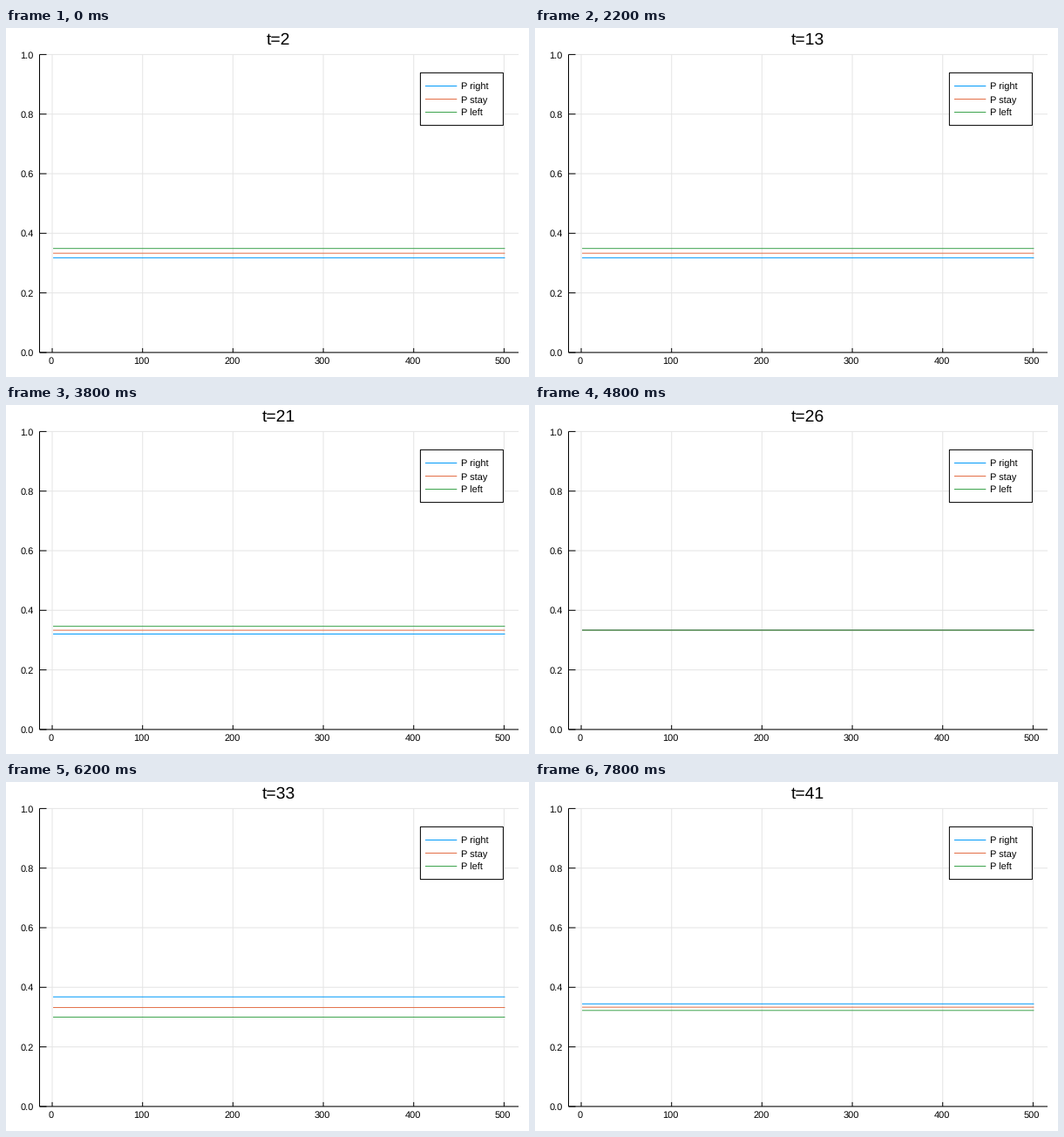
Write a matplotlib script that moves like this. It is 600 px wide and 400 px high and loops after 8 s.

```python
import numpy as np
import matplotlib.pyplot as plt
from matplotlib.animation import FuncAnimation
from matplotlib.patches import Rectangle

W, H, DPI = 600, 400, 100
PX = 72 / DPI
LEFT, RIGHT, TOP, BOTTOM = 38.5, 588, 30.4, 371.9
COLORS = ["#009afa", "#e36f47", "#3ea44e"]
NAMES = ["P right", "P stay", "P left"]

# Drift bias per time step, in hundredths, from t=2 on
BIAS = np.array([
    -4.7, -2, -5.3, -3.5, -1, -3, -2.1, -4, -7, -3,
    -5, -4.7, -2.5, -4.5, -6.1, -3, -1.5, -4, -2.8, -3.9,
    -1.5, -3, -0.8, -2, 0, 1.5, -0.5, 2, 3.4, 1,
    2.5, 10.2, 6, 7.5, 4, 5, 3, 1.5, 2.8, 3.3,
]) / 100

# Snapping would push thin lines half a pixel right and down
plt.rcParams.update({
    "font.family": "Liberation Sans",
    "path.snap": False,
    "text.hinting": "none",
})
fig = plt.figure(figsize=(W / DPI, H / DPI), dpi=DPI, facecolor="white")
ax = fig.add_axes([0, 0, 1, 1])
ax.set_xlim(0, W)
ax.set_ylim(H, 0)
ax.axis("off")


def px(x):
    return LEFT + (x + 14) * (RIGHT - LEFT) / 530


def py(p):
    return BOTTOM - p * (BOTTOM - TOP)


def line(x, y, color, z=3):
    return ax.plot(x, y, color=color, lw=PX, zorder=z,
                   solid_capstyle="butt")[0]


def label(x, y, s, size=11, ha="center"):
    return ax.text(x, y, s, size=size * PX, ha=ha, va="baseline", zorder=6)


def draw_axes():
    for v in range(0, 501, 100):
        x = px(v)
        line([x, x], [TOP, BOTTOM], "#e5e5e5", 1)
        line([x, x], [BOTTOM - 5, BOTTOM], "black", 2)
        label(x - 1.2, 385, str(v))
    for i in range(6):
        y = py(i / 5)
        line([LEFT, RIGHT], [y, y], "#e5e5e5", 1)
        line([LEFT, LEFT + 8], [y, y], "black", 2)
        label(31.5, y + 4, f"{i / 5:.1f}", ha="right")
    line([LEFT, LEFT], [TOP, BOTTOM], "black", 2)
    line([LEFT, RIGHT], [BOTTOM, BOTTOM], "black", 2)


def draw_legend():
    ax.add_patch(Rectangle((475.4, 51.4), 95, 60.2, fc="white", ec="black",
                           lw=PX, zorder=4))
    for i, (name, color) in enumerate(zip(NAMES, COLORS)):
        y = 66.5 + 15 * i
        line([481, 517.3], [y, y], color, 5)
        label(522, y + 4.2, name, ha="left")


draw_axes()
draw_legend()
title = label(312.5, 19, "", size=19.4)
curves = [line([px(1), px(501)], [0, 0], c) for c in COLORS]


def update(i):
    a = BIAS[i]
    weights = np.exp([a, 0, -a])
    for curve, p in zip(curves, weights / weights.sum()):
        curve.set_ydata([py(p)] * 2)
    title.set_text(f"t={i + 2}")
    return [title, *curves]


anim = FuncAnimation(fig, update, frames=len(BIAS), interval=200,
                     repeat=True, repeat_delay=0, blit=False)
plt.show()
```
